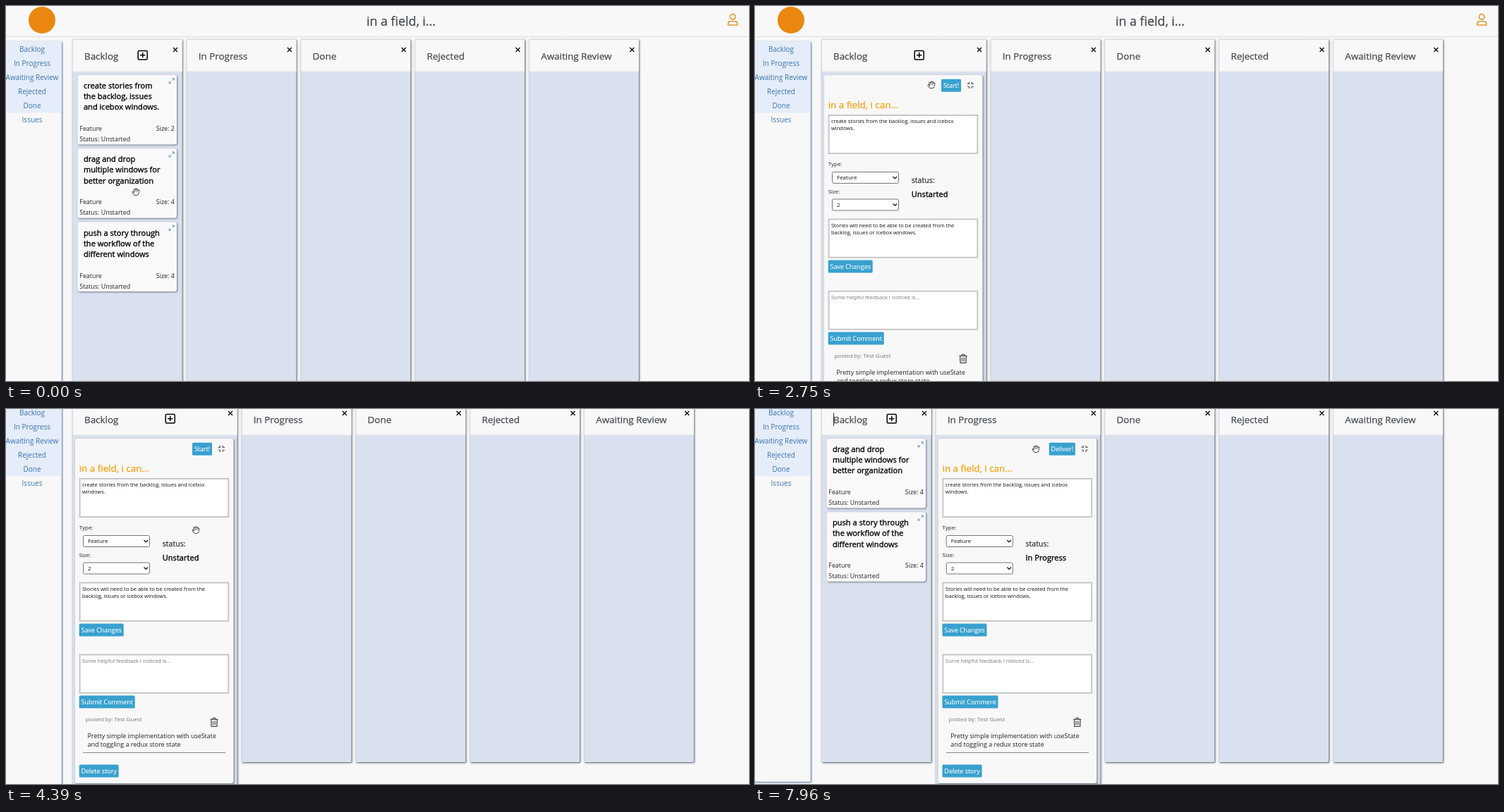
Write an HTML page with a canvas that moves like this. It is 1053 px wide and 532 px high and loops after 8 s.

```html
<!DOCTYPE html>
<html lang="en">
<head>
<meta charset="utf-8">
<title>Story board</title>
<style>
html, body { margin: 0; width: 100%; height: 100%; overflow: hidden; background: #f9f8f8; }
canvas { display: block; }
</style>
</head>
<body>
<canvas id="stage" width="1053" height="532"></canvas>
<script>
const ctx = document.getElementById('stage').getContext('2d');
const W = 1053, H = 532, LOOP = 8000;
const SANS = '"Open Sans", "Noto Sans", sans-serif';
const PAPER = '#f9f8f8', INK = '#434a52', BLUE = '#3b73af';

const OPEN_BACKLOG = 2290, START = 5650, OPEN_PROGRESS = 7290, LOAD = 50;
const CLICKS = [[2130, OPEN_BACKLOG], [5500, START], [7220, OPEN_PROGRESS]];
const TITLES = ['Backlog', 'In Progress', 'Done', 'Rejected', 'Awaiting Review'];
const MENU = ['Backlog', 'In Progress', 'Awaiting Review', 'Rejected', 'Done', 'Issues'];
const STORIES = [
  { size: 2, lines: ['create stories from', 'the backlog, issues', 'and icebox windows.'] },
  { size: 4, lines: ['drag and drop', 'multiple windows for', 'better organization'] },
  { size: 4, lines: ['push a story through', 'the workflow of the', 'different windows'] }
];

// time, x, y
const POINTER = [
  [640, 184, 264], [1450, 232, 129], [2130, 235, 107], [2500, 235, 107],
  [2750, 250, 112], [3100, 268, 168.5], [3780, 268, 168.5], [3900, 269, 172],
  [4390, 269, 172], [4660, 271, 160], [5250, 293, 85], [5520, 282, 54],
  [6000, 282, 54], [6350, 330, 79], [6780, 396, 51], [7640, 396, 51], [7960, 398, 57]
];
// time, page offset
const SCROLL = [[3230, 0], [3640, 125], [4190, 125], [4380, 56]];

function track(keys, t, ease) {
  if (t <= keys[0][0]) return keys[0].slice(1);
  for (let i = 1; i < keys.length; i++) {
    const a = keys[i - 1], b = keys[i];
    if (t < b[0]) {
      let k = (t - a[0]) / (b[0] - a[0]);
      if (ease) k = k * k * (3 - 2 * k);
      return a.slice(1).map((v, n) => v + (b[n + 1] - v) * k);
    }
  }
  return keys[keys.length - 1].slice(1);
}

function text(s, x, y, size, color, align = 'left', heavy = 0) {
  ctx.font = size + 'px ' + SANS;
  ctx.textAlign = align;
  ctx.fillStyle = color;
  ctx.fillText(s, x, y);
  if (heavy) {
    ctx.strokeStyle = color;
    ctx.lineWidth = heavy;
    ctx.lineJoin = 'round';
    ctx.strokeText(s, x, y);
  }
}

function rect(x, y, w, h, color) {
  ctx.fillStyle = color;
  ctx.fillRect(x, y, w, h);
}

function round(x, y, w, h, r) {
  ctx.beginPath();
  ctx.roundRect(x, y, w, h, r);
}

function lines(color, width, ...paths) {
  ctx.strokeStyle = color;
  ctx.lineWidth = width;
  ctx.beginPath();
  for (const p of paths) {
    ctx.moveTo(p[0], p[1]);
    for (let i = 2; i < p.length; i += 2) ctx.lineTo(p[i], p[i + 1]);
  }
  ctx.stroke();
}

function raised(x, y, w, h, r, color, shadow, blur = 2.5) {
  ctx.save();
  ctx.shadowColor = shadow;
  ctx.shadowBlur = blur;
  ctx.shadowOffsetX = ctx.shadowOffsetY = 1;
  ctx.fillStyle = color;
  round(x, y, w, h, r);
  ctx.fill();
  ctx.restore();
}

function button(label, x, y, w) {
  ctx.fillStyle = '#38a1cf';
  round(x, y, w, 18, 1.5);
  ctx.fill();
  text(label, x + w / 2, y + 12.3, 8.95, '#fff', 'center', 0.12);
}

function textarea(x, y, rows, color = '#111') {
  rect(x, y, 212.5, 56, '#c3c3c3');
  rect(x + 1.8, y + 1.8, 208.9, 52.4, '#fff');
  rows.forEach((s, i) => text(s, x + 4.3, y + 12.2 + i * 10, 7.5, color));
}

function select(label, x, y) {
  ctx.fillStyle = '#fff';
  round(x + 0.5, y + 0.5, 94, 16, 2);
  ctx.fill();
  ctx.strokeStyle = '#777';
  ctx.lineWidth = 1;
  ctx.stroke();
  text(label, x + 7, y + 11.4, 8, '#111');
  lines('#222', 1.4, [x + 86.5, y + 7, x + 89.3, y + 9.8, x + 92.1, y + 7]);
}

function expandIcon(x, y) {
  lines('#4a86c0', 0.9, [x + 0.7, y - 0.7, x + 3.3, y - 3.3], [x - 0.7, y + 0.7, x - 3.3, y + 3.3],
    [x + 0.8, y - 3.5, x + 3.5, y - 3.5, x + 3.5, y - 0.8],
    [x - 0.8, y + 3.5, x - 3.5, y + 3.5, x - 3.5, y + 0.8]);
}

function collapseIcon(x, y) {
  for (const a of [-1, 1]) for (const b of [-1, 1])
    lines('#555', 1.1, [x + a * 4.6, y + b * 1.9, x + a * 1.9, y + b * 1.9, x + a * 1.9, y + b * 4.6]);
}

function trashIcon(x, y) {
  lines('#444b52', 1.2, [x - 5.5, y - 4, x + 5.5, y - 4],
    [x - 2.3, y - 4, x - 1.5, y - 6, x + 1.5, y - 6, x + 2.3, y - 4],
    [x - 4.3, y - 4, x - 4.1, y + 6, x + 4.1, y + 6, x + 4.3, y - 4]);
  lines('#444b52', 0.9, [x - 2, y - 1.8, x - 2, y + 4], [x, y - 1.8, x, y + 4], [x + 2, y - 1.8, x + 2, y + 4]);
}

function card(story, x, y, status) {
  raised(x, y, 140.5, 98.5, 3, '#faf9f9', 'rgba(50,60,80,.65)');
  story.lines.forEach((s, i) => text(s, x + 8.4, y + 19 + i * 15.1, 11.1, '#000', 'left', 0.35));
  text('Feature', x + 2.8, y + 79, 8.9, '#222');
  text('Size: ' + story.size, x + 137.3, y + 79, 8.9, '#222', 'right');
  text('Status: ' + status, x + 2.8, y + 94, 8.9, '#222');
  expandIcon(x + 133.2, y + 8.3);
}

function openCard(cx, status, action, loaded) {
  const x = cx + 9.7, drop = loaded ? 67 : 0, wide = action === 'Start!' ? 28 : 37;
  raised(cx + 4, 98, 224.5, 422 + drop, 3, PAPER, 'rgba(50,60,80,.7)');
  button(action, cx + 198 - wide, 103.7, wide);
  collapseIcon(cx + 211.3, 112.3);
  text('in a field, i can...', x, 145, 13.4, '#fb9f0c', 'left', 0.25);
  textarea(x, 154, ['create stories from the backlog, issues and icebox', 'windows.']);
  text('Type:', x, 227, 8, '#222');
  select('Feature', x + 5.3, 235);
  text('Size:', x, 265.7, 8, '#222');
  select('2', x + 5.3, 273.5);
  text('status:', x + 118, 251.2, 10.6, '#333', 'left', 0.25);
  text(status, x + 118, 271.3, 11.1, '#000', 'left', 0.35);
  textarea(x, 301.6, ['Stories will need to be able to be created from the', 'backlog, issues or icebox windows.']);
  button('Save Changes', x, 360.5, 63);
  textarea(x, 403.7, ['Some helpful feedback I noticed is...'], '#757575');
  button('Submit Comment', x, 462.5, 79);
  if (loaded) {
    text('posted by: Test Guest', x + 9, 498.8, 8, '#757575');
    trashIcon(cx + 201, 500.3);
    text('Pretty simple implementation with useState', x + 11.7, 522.6, 8.98, '#222');
    text('and toggling a redux store state', x + 11.7, 535, 8.98, '#222');
    rect(x + 5.5, 543, 202, 1, '#888');
  }
  button('Delete story', x, 493.5 + drop, 56);
}

function column(title, x, w, bottom, plus) {
  raised(x, 47, w - 0.4, bottom - 47, 1, '#dae1ee', 'rgba(45,55,75,.85)');
  rect(x, 47, w - 0.4, 46, PAPER);
  rect(x, 47, w - 0.4, 0.8, '#d2d4d8');
  rect(x, 47, 0.8, bottom - 47, '#cdd2db');
  rect(x, 92.5, w - 0.4, 0.8, '#e4e6ea');
  text(title, x + 17, 75.8, 13.4, INK, 'left', 0.25);
  const cx = x + w - 10, cy = 62;
  lines('#000', 1.25, [cx - 3, cy - 3, cx + 3, cy + 3], [cx + 3, cy - 3, cx - 3, cy + 3]);
  if (plus) {
    const px = x + w / 2 + 21.7, py = 69.7;
    ctx.strokeStyle = '#000';
    ctx.lineWidth = 1.5;
    round(px - 6.5, py - 6.3, 13, 12.6, 1.5);
    ctx.stroke();
    lines('#000', 1.5, [px - 3.6, py, px + 3.6, py], [px, py - 3.6, px, py + 3.6]);
  }
}

function header() {
  lines('#dcdcdc', 1, [0, 43.5, W, 43.5]);
  ctx.fillStyle = '#ea870f';
  ctx.beginPath();
  ctx.arc(51, 20, 19, 0, 7);
  ctx.fill();
  text('in a field, i...', 560, 28, 17.8, INK, 'center', 0.25);
  ctx.strokeStyle = '#e0962f';
  ctx.lineWidth = 1.6;
  ctx.beginPath();
  ctx.arc(1030, 15.2, 3.7, 0, 7);
  ctx.moveTo(1023.4, 27);
  ctx.lineTo(1023.4, 25.5);
  ctx.quadraticCurveTo(1023.6, 21.8, 1027.3, 21.8);
  ctx.lineTo(1032.7, 21.8);
  ctx.quadraticCurveTo(1036.4, 21.8, 1036.6, 25.5);
  ctx.lineTo(1036.6, 27);
  ctx.closePath();
  ctx.stroke();
}

function sidebar(bottom) {
  raised(-5, 50, 83.8, bottom - 50, 1, PAPER, '#3f6a99');
  rect(0, 50, 78.4, 101.5, '#e5edfa');
  MENU.forEach((s, i) => text(s, 37, 64.6 + i * 20.1, 10, BLUE, 'center'));
}

function footer(top) {
  rect(0, top, W, 120, '#eee');
  text('Developed by:', 23, top + 26, 8.3, '#333');
  ctx.fillStyle = '#f2a03d';
  for (const x of [115, 148]) {
    round(x, top + 17, 22, 22, 3);
    ctx.fill();
  }
}

function hand(x, y, lit) {
  const fill = lit ? '#f6f23c' : '#fff';
  ctx.save();
  ctx.translate(x, y);
  if (lit) {
    ctx.fillStyle = fill;
    ctx.beginPath();
    ctx.arc(0, 0, 6.3, 0, 7);
    ctx.fill();
  }
  ctx.lineCap = ctx.lineJoin = 'round';
  const fingers = [[-2.3, -3, -1, 2], [0, -4, 0.2, 2], [2.2, -3.4, 1.7, 2], [4, -1.8, 2.6, 2.8],
    [-4, 0.4, -1.2, 3.6], [-0.4, 3.4, 1.6, 3.4]];
  lines('#222', 2.8, ...fingers);
  lines(fill, 1.3, ...fingers);
  rect(-1.2, 0.5, 3.4, 3, fill);
  ctx.restore();
}

function beam(x, y) {
  lines('#111', 1, [x, y - 4, x, y + 4], [x - 2.5, y - 5, x - 0.8, y - 5, x, y - 4, x + 0.8, y - 5, x + 2.5, y - 5],
    [x - 2.5, y + 5, x - 0.8, y + 5, x, y + 4, x + 0.8, y + 5, x + 2.5, y + 5]);
}

function draw(t) {
  const started = t >= START;
  const openAt = started ? OPEN_PROGRESS : OPEN_BACKLOG;
  const open = t >= openAt, loaded = t >= openAt + LOAD;
  const active = started ? 1 : 0;
  const status = started ? 'In Progress' : 'Unstarted';
  const piles = started ? [STORIES.slice(1), STORIES.slice(0, 1)] : [STORIES, []];

  let x = 94, tallest = 557;
  const columns = TITLES.map((title, i) => {
    const isOpen = open && i === active, w = isOpen ? 234 : 156;
    let y = 98;
    const items = (piles[i] || []).map((story, n) => {
      const top = y, full = isOpen && n === 0;
      y += full ? (loaded ? 494.5 : 427.5) : 104.3;
      return { story, top, full };
    });
    const col = { title, x, w, items, bottom: Math.max(557, y - 4.8) };
    tallest = Math.max(tallest, col.bottom);
    x += w + 5.8;
    return col;
  });

  rect(0, 0, W, H, PAPER);
  ctx.save();
  ctx.translate(0, -track(SCROLL, t, true)[0]);
  header();
  sidebar(tallest - 3);
  footer(tallest + 8);
  columns.forEach((c, i) => {
    column(c.title, c.x, c.w, c.bottom, i === 0);
    for (const it of c.items) {
      const label = i === active ? status : 'Unstarted';
      if (it.full) openCard(c.x, label, started ? 'Deliver!' : 'Start!', loaded);
      else card(it.story, c.x + c.w / 2 - 70.5, it.top, label);
    }
  });
  // blinking text caret
  if (started && (t - 5570) % 1060 < 530) rect(111, 61.5, 1, 18.5, '#333');
  ctx.restore();

  const [px, py] = track(POINTER, t);
  if (t >= 3060 && t < 3840) beam(px, py);
  else hand(px, py, CLICKS.some(([a, b]) => t >= a && t < b));
}

const begin = performance.now();
function tick() {
  draw((performance.now() - begin) % LOOP);
  requestAnimationFrame(tick);
}
tick();
</script>
</body>
</html>
```
